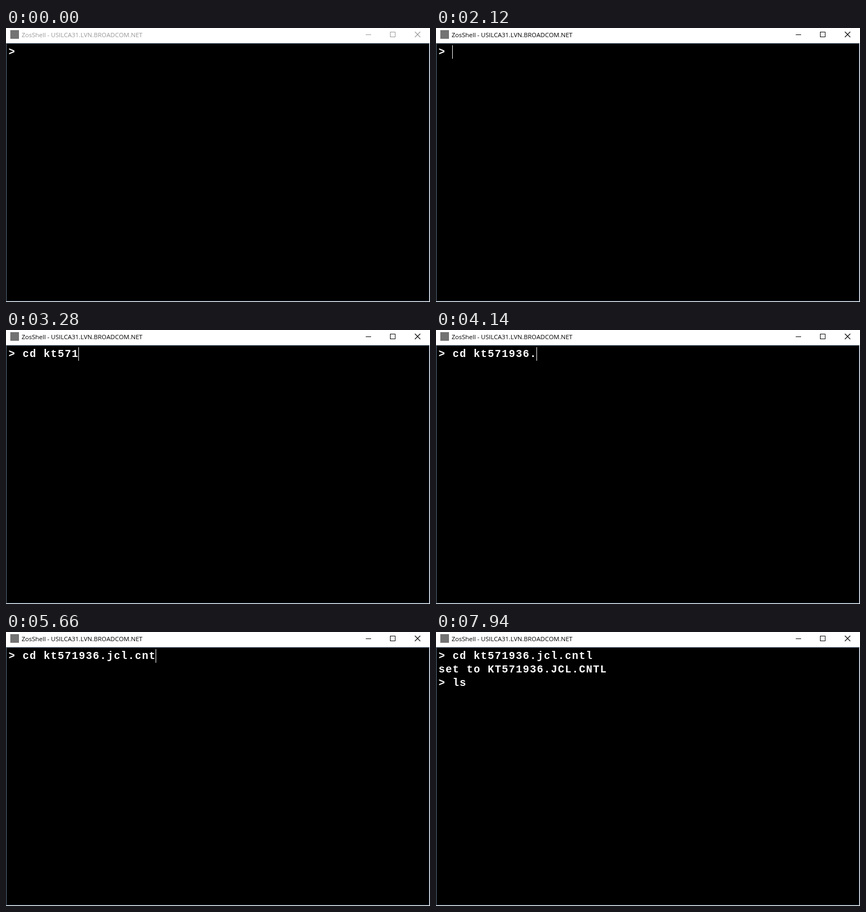
Recreate the animation shown at these times as an HTML page with a canvas. Size 785x508 px, loop 8000 ms.

```html
<!DOCTYPE html>
<html lang="en">
<head>
<meta charset="utf-8">
<title>ZosShell</title>
<style>
  html, body { margin: 0; width: 100%; height: 100%; overflow: hidden; background: #fff; }
  canvas { display: block; }
</style>
</head>
<body>
<canvas id="stage" width="785" height="508"></canvas>
<script>
const ctx = document.getElementById('stage').getContext('2d');

const LOOP = 8000, BLINK = 530;
const CELL = 13, ROW = 25, LEFT = 4, TOP = 32;
const FOCUS = 1060, ENTER_CD = 6130, ENTER_LS = 7410;

const CD = 'cd kt571936.jcl.cntl';
const REPLY = 'set to KT571936.JCL.CNTL';
const LS = 'ls';

// Typing pace: [ms, characters], steady between points
const CD_PACE = [[2260, 2], [3610, 10], [4570, 14], [5860, CD.length]];
const LS_PACE = [[6940, 1], [7070, LS.length]];

// Pointer path: [ms, x, y]; the pointer moves in steps of POINTER_STEP
const POINTER_STEP = 65, POINTER_IN = 730, POINTER_OUT = 1590;
const POINTER_PATH = [
  [POINTER_IN, 244, 478], [1120, 212, 432], [1185, 206, 429], [1320, 206, 429], [1470, 38, 425]
];

// Linear interpolation along points of [ms, ...values]
function along(points, t) {
  const next = points.findIndex(p => p[0] > t);
  if (next < 0) return points[points.length - 1].slice(1);
  if (next === 0) return points[0].slice(1).fill(0);
  const a = points[next - 1], b = points[next];
  const k = (t - a[0]) / (b[0] - a[0]);
  return a.slice(1).map((v, i) => v + (b[i + 1] - v) * k);
}

function typed(text, pace, t) {
  return text.slice(0, Math.floor(along(pace, t)[0]));
}

// The caret starts a new blink at each input and stays lit while typing
function caretLit(t) {
  const span = pace => [pace[0][0], pace[pace.length - 1][0]];
  const inputs = [
    [FOCUS, FOCUS], span(CD_PACE), [ENTER_CD, ENTER_CD], span(LS_PACE), [ENTER_LS, ENTER_LS]
  ].filter(([from]) => t >= from);
  if (!inputs.length) return false;
  const idle = Math.max(0, t - inputs.pop()[1]);
  return Math.floor(idle / BLINK) % 2 === 0;
}

function rect(x, y, w, h, color) {
  ctx.fillStyle = color;
  ctx.fillRect(x, y, w, h);
}

function write(text, x, y, font, color, spacing) {
  ctx.font = font;
  ctx.letterSpacing = spacing + 'px';
  ctx.fillStyle = color;
  ctx.fillText(text, x, y);
}

function line(text, row) {
  const size = 19.5, gap = CELL - size * 0.6;
  write(text, LEFT + gap / 2, TOP + 18 + row * ROW,
    `bold ${size}px "Liberation Mono", monospace`, '#fff', gap);
}

function drawWindow(active) {
  const ink = active ? '#000' : '#999';
  rect(0, 0, 785, 508, '#fff');
  rect(0, 28, 784, 479, '#64788c');
  rect(1, 29, 782, 477, '#000');
  rect(8, 4, 16, 16, '#737373');
  write('ZosShell - USILCA31.LVN.BROADCOM.NET', 29, 17,
    '11.5px "Open Sans", sans-serif', ink, 0);

  rect(666, 12, 10, 1, ink);
  ctx.strokeStyle = ink;
  ctx.lineWidth = 1;
  ctx.strokeRect(711.5, 7.5, 9, 9);
  ctx.lineWidth = 1.2;
  ctx.beginPath();
  ctx.moveTo(757, 7);
  ctx.lineTo(767, 17);
  ctx.moveTo(767, 7);
  ctx.lineTo(757, 17);
  ctx.stroke();
}

function drawTerminal(t) {
  const cd = typed(CD, CD_PACE, t), ls = typed(LS, LS_PACE, t);
  let row = 0, col = 2 + cd.length, height = ROW;

  line('> ' + cd, 0);
  if (t >= ENTER_CD) {
    line(REPLY, 1);
    line('> ' + ls, 2);
    row = 2;
    col = 2 + ls.length;
  }
  if (t >= ENTER_LS) {
    row = 3;
    col = 0;
    height = 16;
  }
  if (caretLit(t)) rect(LEFT + col * CELL, TOP + row * ROW, 1, height, '#fff');
}

function drawPointer(t) {
  if (t < POINTER_IN || t >= POINTER_OUT) return;
  const step = Math.floor((t - POINTER_IN) / POINTER_STEP);
  const [x, y] = along(POINTER_PATH, POINTER_IN + step * POINTER_STEP).map(Math.round);
  ctx.fillStyle = '#7f7f00';
  ctx.beginPath();
  ctx.arc(x, y, 12, 0, Math.PI * 2);
  ctx.fill();
  rect(x + 2, y - 6, 1, 14, '#fff');
  for (const end of [-7, 8]) {
    rect(x - 1, y + end, 3, 1, '#fff');
    rect(x + 3, y + end, 3, 1, '#fff');
  }
}

function draw(now) {
  const t = now % LOOP;
  drawWindow(t >= FOCUS);
  drawTerminal(t);
  drawPointer(t);
}

const start = performance.now();
function tick() {
  draw(performance.now() - start);
  requestAnimationFrame(tick);
}
ctx.fontKerning = 'none';
tick();
</script>
</body>
</html>
```
